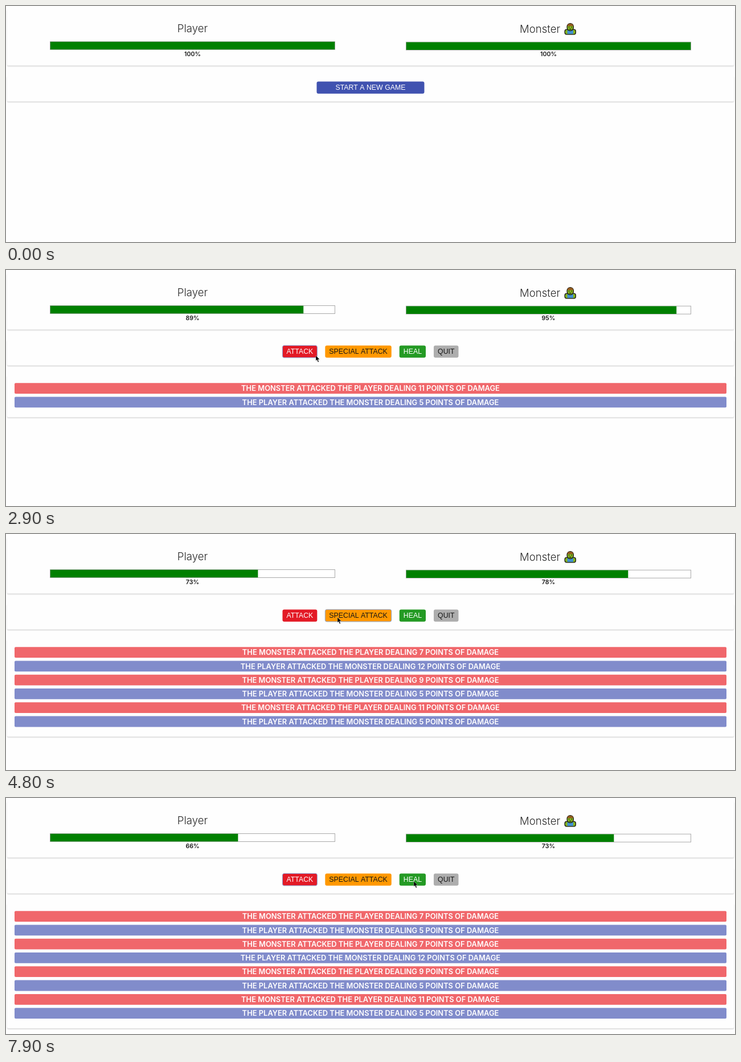
These frames come from a looping animation (1280 px wide and 414 px high, 8 s). An HTML page with a canvas:

```html
<!DOCTYPE html>
<html lang="en">
<head>
<meta charset="utf-8">
<title>Monster battle</title>
<style>
  html, body { margin: 0; width: 100%; height: 100%; overflow: hidden; background: #fefefe; }
  canvas { display: block; }
</style>
</head>
<body>
<canvas id="stage" width="1280" height="414"></canvas>
<script>
const ctx = document.getElementById('stage').getContext('2d');
const LOOP = 8000, STEP = 100;
const GAME_START = 1400, POINTER_START = 200;
const PAPER = '#fefefe', INK = '#161616';
const TITLE_FONT = '300 18.6px Inter, sans-serif';
const LABEL_FONT = '600 10.6px Inter, sans-serif';
const LOG_FONT = '600 12.9px Inter, sans-serif';
const BUTTON_FONT = '12.35px "Liberation Sans", Arial, sans-serif';

const rounds = [
  { at: 2900, player: 5, monster: 11 },
  { at: 3500, player: 5, monster: 9 },
  { at: 4800, player: 12, monster: 7, special: true },
  { at: 6000, player: 5, monster: 7 },
];

// Each move starts where the one before it ended
const moves = [
  { from: POINTER_START, to: 1000, x: 563, y: 147 },
  { from: 1000, to: 1600, x: 561, y: 156 },
  { from: 1700, to: 2200, x: 544, y: 150, sag: 6 },
  { from: 4300, to: 4600, x: 582, y: 146 },
  { from: 4800, to: 5200, x: 545, y: 152 },
  { from: 5600, to: 6000, x: 529.5, y: 143 },
  { from: 6200, to: 6600, x: 606, y: 156 },
  { from: 6700, to: 7900, x: 716, y: 146, sag: 13 },
];

const startMenu = [{ label: 'START A NEW GAME', fill: '#4052b0', color: '#fff', pad: 33 }];
const fightMenu = [
  { label: 'ATTACK', fill: '#e31a26', color: '#fff' },
  { label: 'SPECIAL ATTACK', fill: '#ff9800', color: INK },
  { label: 'HEAL', fill: '#249a24', color: '#fff' },
  { label: 'QUIT', fill: '#adadad', color: INK },
];

function text(str, x, y, font, color, align = 'center') {
  ctx.font = font;
  ctx.fillStyle = color;
  ctx.textAlign = align;
  ctx.fillText(str, x, y);
}

function box(x, y, w, h, r, color) {
  ctx.beginPath();
  ctx.roundRect(x, y, w, h, r);
  ctx.fillStyle = color;
  ctx.fill();
}

function outlined(x, y, w, h, r, color) {
  box(x, y, w, h, r, INK);
  box(x + 1.3, y + 1.3, w - 2.6, h - 2.6, r - 1, color);
}

function card(top, bottom) {
  ctx.save();
  ctx.shadowColor = '#d6d6d6';
  ctx.shadowBlur = 2;
  ctx.shadowOffsetY = 1.5;
  box(2, top, 1276, bottom - top, 2, PAPER);
  ctx.restore();
}

function healthBar(x, y, health) {
  const inset = 0.8;
  box(x, y, 501, 15, 0, '#aaa');
  box(x + 1, y + 1, 499, 13, 0, '#fff');
  box(x + inset, y + inset, (501 - 2 * inset) * health / 100, 15 - 2 * inset, 0, '#008000');
  text(health + '%', x + 250.5, y + 25.6, LABEL_FONT, INK);
}

function menu(buttons, focus) {
  const gap = 14;
  ctx.font = BUTTON_FONT;
  const widths = buttons.map(b => ctx.measureText(b.label).width + 2 * (b.pad || 7));
  let x = 640 - (widths.reduce((a, b) => a + b) + gap * (buttons.length - 1)) / 2;
  buttons.forEach((b, i) => {
    box(x, 132.4, widths[i], 21.4, 3, b.fill);
    if (i === focus) {
      ctx.strokeStyle = '#8ba4d8';
      ctx.lineWidth = 1;
      ctx.stroke();
    }
    text(b.label, x + widths[i] / 2, 147, BUTTON_FONT, b.color);
    x += widths[i] + gap;
  });
}

function zombie(x, y) {
  const skin = '#86b51c';
  ctx.save();
  ctx.translate(x, y);
  outlined(0, 10.5, 20.5, 10, 4, skin);
  box(5, 12, 10.5, 7, 1, '#4190d0');
  outlined(4, 0, 12.5, 14, 6, skin);
  box(5.3, 1.3, 9.9, 4, [5, 5, 1, 1], '#94591f');
  for (const eye of [7.2, 11.6]) box(eye, 6.2, 1.7, 1.7, 0.8, INK);
  box(8.3, 10, 4, 1.2, 0.5, INK);
  ctx.restore();
}

function pointerAt(time) {
  let x = 17, y = 26;
  for (const m of moves) {
    if (time <= m.from) break;
    const k = Math.min(1, (time - m.from) / (m.to - m.from));
    const ease = k * k * (3 - 2 * k);
    x += (m.x - x) * ease;
    y += (m.y - y) * ease + (m.sag || 0) * Math.sin(Math.PI * k);
  }
  return [x, y];
}

function pointer(time) {
  if (time < POINTER_START) return;
  ctx.save();
  ctx.translate(...pointerAt(time));
  const arrow = new Path2D('M0 0V9.2L2.1 7.4L3.7 11.6L5.4 10.9L3.7 6.9L6.6 6.7Z');
  ctx.fillStyle = '#000';
  ctx.fill(arrow);
  ctx.strokeStyle = 'rgba(255,255,255,.65)';
  ctx.lineWidth = 0.5;
  ctx.stroke(arrow);
  ctx.restore();
}

function log(played) {
  if (!played.length) return;
  const top = 198.2, pitch = 24.28;
  const lines = [...played].reverse().flatMap(r => [
    ['MONSTER', 'PLAYER', r.monster, '#f0676b'],
    ['PLAYER', 'MONSTER', r.player, '#818ccb'],
  ]);
  card(185, top + 11.6 + lines.length * pitch);
  lines.forEach(([from, to, points, color], i) => {
    const y = top + i * pitch;
    box(15, y, 1250, 18.8, 2, color);
    text(`THE ${from} ATTACKED THE ${to} DEALING ${points} POINTS OF DAMAGE`,
      640, y + 14.1, LOG_FONT, '#fff');
  });
}

function draw(time) {
  const played = rounds.filter(r => r.at <= time);
  const healthAfter = attacker => played.reduce((left, r) => left - r[attacker], 100);

  box(0, 0, 1280, 414, 0, PAPER);
  card(6, 104.5);
  text('Player', 327.5, 46, TITLE_FONT, '#2a2a2a');
  text('Monster', 902, 46.8, TITLE_FONT, '#2a2a2a', 'left');
  zombie(980.5, 30);
  healthBar(77, 62, healthAfter('monster'));
  healthBar(702, 62.7, healthAfter('player'));

  card(123, 167.5);
  if (time < GAME_START) menu(startMenu);
  else menu(fightMenu, played.at(-1)?.special ? 1 : 0);

  log(played);
  pointer(time);
}

function tick() {
  const time = performance.now() % LOOP;
  draw(Math.floor(time / STEP) * STEP);
  requestAnimationFrame(tick);
}
tick();
</script>
</body>
</html>
```
